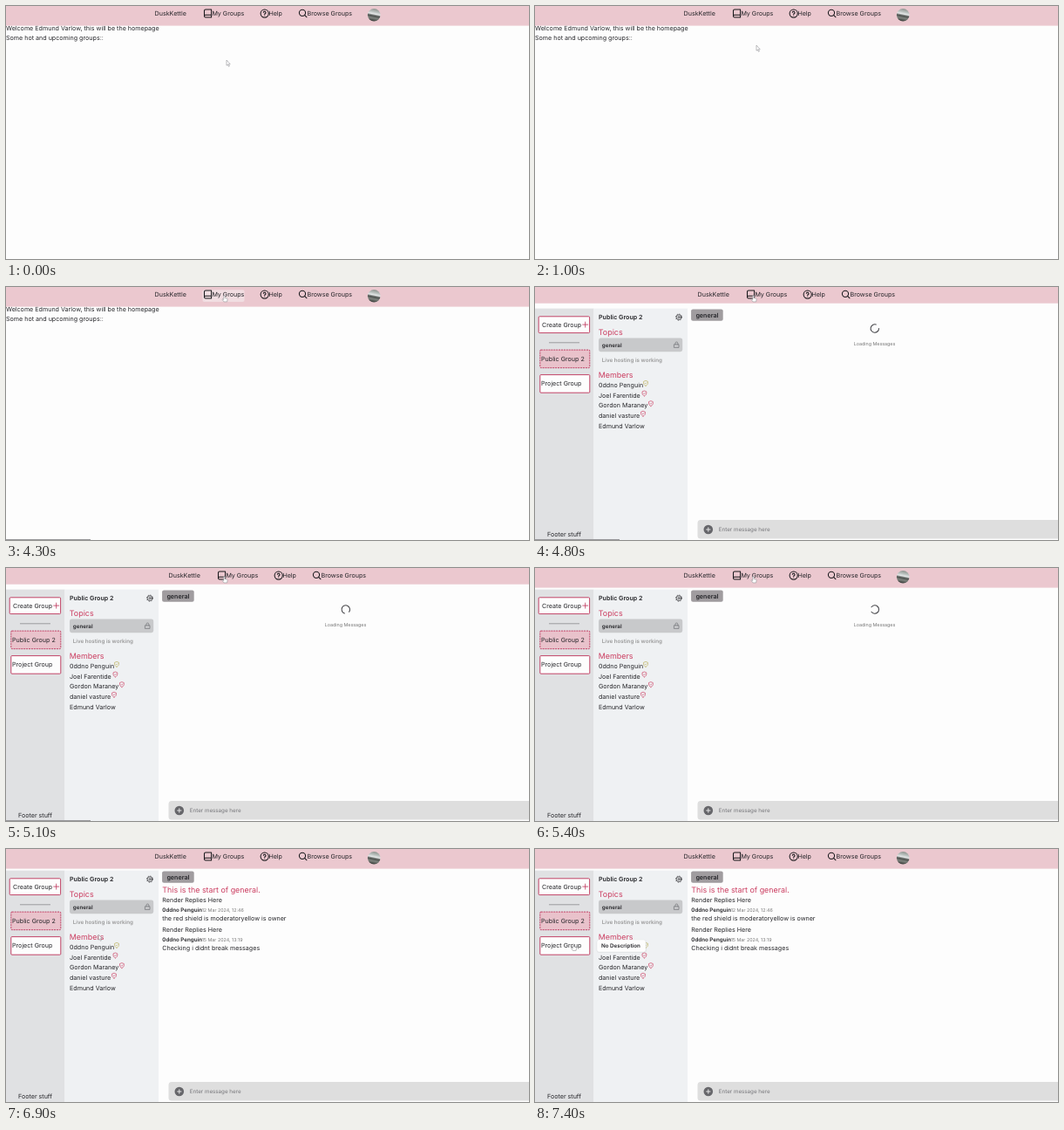
Write an HTML page that moves like this. It is 600 px wide and 290 px high and loops after 8000 ms.

```html
<!DOCTYPE html>
<html lang="en">
<head>
<meta charset="utf-8">
<title>Group chat</title>
<style>
html, body { margin: 0; width: 100%; height: 100%; overflow: hidden; background: #fdfdfd; }
svg { display: block; width: 100%; height: 100%; }
text { font: 7.13px Inter, Roboto, sans-serif; fill: #242428; white-space: pre; text-rendering: geometricPrecision; }
.sm { font-size: 6.24px; }
.xs { font-size: 5.35px; fill: #777; }
.lg { font-size: 8.91px; fill: #cb3d60; }
.b { font-weight: 600; }
.dim { fill: #999; }
.line { fill: none; stroke: #18181b; stroke-linecap: round; stroke-linejoin: round; }
.btn { fill: #fdfdfd; stroke: #bd3159; stroke-width: .9; }
.cursor { fill: #fff; stroke: #88888d; stroke-width: .55; stroke-linejoin: round; }
</style>
</head>
<body>
<svg viewBox="0 0 600 290" preserveAspectRatio="none">
  <defs>
    <linearGradient id="photo" x1=".6" y1="0" x2=".4" y2="1">
      <stop offset="0" stop-color="#8b918c"/>
      <stop offset=".25" stop-color="#b9c0bd"/>
      <stop offset=".42" stop-color="#e4e7e7"/>
      <stop offset=".56" stop-color="#4c504d"/>
      <stop offset=".75" stop-color="#7e837e"/>
      <stop offset="1" stop-color="#2f322f"/>
    </linearGradient>
    <g id="shield" fill="none" stroke-width="2.2" stroke-linejoin="round" stroke-linecap="round">
      <path d="M12 22s8-4 8-10V5l-8-3-8 3v7c0 6 8 10 8 10M9 12l2 2 4-4"/>
    </g>
  </defs>
  <rect width="600" height="290" fill="#fdfdfd"/>

  <g id="home">
    <text x="0" y="28.2">Welcome Edmund Varlow, this will be the homepage</text>
    <text x="0" y="38.7">Some hot and upcoming groups::</text>
  </g>

  <g id="group">
    <rect y="24.6" width="67.5" height="265.4" fill="#e0e1e3"/>
    <rect x="67.5" y="24.6" width="107.5" height="265.4" fill="#eff1f3"/>

    <rect class="btn" x="4.2" y="33.8" width="58.4" height="18.8" rx="1"/>
    <text x="8" y="45.6">Create Group</text>
    <path class="line" d="M54.7 43.1h6M57.7 40.1v6" style="stroke:#bd3159" stroke-width=".8"/>
    <path d="M16 63.8h35" stroke="#929396" stroke-width=".9"/>
    <rect class="btn" x="5.8" y="72.1" width="57" height="20.6" rx="1" style="fill:#e9c2cb" stroke-dasharray="2 .9"/>
    <text x="7" y="84.8">Public Group 2</text>
    <rect class="btn" x="5.8" y="100.6" width="57" height="20.6" rx="1"/>
    <text x="7" y="113.4">Project Group</text>
    <text x="14" y="285.5">Footer stuff</text>

    <text class="b" x="73" y="37.1">Public Group 2</text>
    <g class="line" style="stroke:#36363a">
      <circle cx="165" cy="34.6" r="2.9" stroke-width=".8"/>
      <circle cx="165" cy="34.6" r="3.6" stroke-width=".8" stroke-dasharray="1.1 1.73" stroke-linecap="butt"/>
      <circle cx="165" cy="34.6" r="1.1" stroke-width=".7"/>
    </g>
    <text class="lg" x="72.8" y="55.2">Topics</text>
    <rect x="73" y="58.6" width="96.2" height="15.6" rx="2.4" fill="#c8c9cb"/>
    <text class="sm b" x="76.8" y="68.6">general</text>
    <path class="line" d="M159.8 65.8h5.2v3.6h-5.2zM161 65.800v-1.400a1.400 1.400 0 0 1 2.800 0v1.400" style="stroke:#707276" stroke-width=".7"/>
    <text class="sm b dim" x="76.8" y="85.5">Live hosting is working</text>
    <text class="lg" x="72.8" y="104.2">Members</text>
    <g id="members"></g>

    <rect x="179.1" y="25.4" width="36.6" height="13.4" rx="2" fill="#a09c9f"/>
    <text class="b" x="184.4" y="34.6">general</text>

    <g id="loading">
      <path id="spinner" class="line" d="M4.7 0A4.7 4.7 0 1 1 1.45 -4.47" style="stroke:#48484c" stroke-width="1.1"/>
      <text class="xs" x="389.5" y="67.1" text-anchor="middle">Loading Messages</text>
    </g>
    <g id="chat"></g>

    <path d="M600 267H190q-3.5 0-3.5 3.5v14.500q0 3.500 3.500 3.500H600z" fill="#dedede"/>
    <circle cx="198.8" cy="278" r="5.3" fill="#66666a"/>
    <path d="M196.2 278h5.2M198.8 275.4v5.2" stroke="#e4e4e4"/>
    <text class="sm" x="210.8" y="280.1" style="fill:#77777b">Enter message here</text>
  </g>

  <rect id="bar" width="600" fill="#ebc8cf"/>
  <g id="nav">
    <rect id="pill" x="225.5" y="3.2" width="48" height="13.8" rx="2" fill="#f1dee2"/>
    <text x="170.6" y="11.1">DuskKettle</text>
    <g class="line" stroke-width="1.05">
      <path d="M229 4h6.600v9H229a1.500 1.500 0 0 1-1.500-1.500v-6A1.500 1.500 0 0 1 229 4zM227.500 11.500a1.300 1.300 0 0 1 1.300-1.200h6.800"/>
      <circle cx="296.7" cy="8.6" r="4.6"/>
      <path d="M295.3 7.2a1.4 1.4 0 0 1 2.7.5c0 .9-1.3 1.1-1.3 1.8M296.7 10.9v.1"/>
      <circle cx="340" cy="7.8" r="3.6"/>
      <path d="M342.6 10.4l2.400 2.400"/>
    </g>
    <text x="236.4" y="11.1">My Groups</text>
    <text x="301.4" y="11.1">Help</text>
    <text x="345.5" y="11.1">Browse Groups</text>
  </g>
  <circle id="avatar" cx="422.2" cy="10.3" r="7.3" fill="url(#photo)"/>

  <g id="tip">
    <rect x="70.7" y="104.4" width="57" height="14.4" rx="2.4" fill="#000" opacity=".07"/>
    <rect x="71" y="104" width="56" height="14" rx="2.2" fill="#fdfdfd" stroke="#e2e4e7" stroke-width=".5"/>
    <text class="sm b" x="76" y="113.3">No Description</text>
  </g>
  <rect id="status" y="289" width="97" height="1" fill="#98989b"/>

  <path id="arrow" class="cursor" d="M0 0V6.2L1.4 5L2.4 7.3L3.4 6.9L2.4 4.6H4.2Z"/>
  <path id="hand" class="cursor" d="M-.7 .6a.7.7 0 0 1 1.4 0V3l2.3.6q.7.2.6 1L3.100 7.400H-.6L-2.300 5q-.3-.8.5-.8l1.100.8Z"/>
</svg>
<script>
const LOOP = 8000, STEP = 100;
const $ = id => document.getElementById(id);
const show = (id, on) => $(id).setAttribute('visibility', on ? 'visible' : 'hidden');
const place = (id, x, y, turn = 0) =>
  $(id).setAttribute('transform', `translate(${x} ${y}) rotate(${turn})`);
const label = (x, y, words, kind = '') => `<text class="${kind}" x="${x}" y="${y}">${words}</text>`;

const RED = '#cb3d60', OWNER = '#b9ad55';
const members = [
  ['0ddno Penguin', 123.4, OWNER],
  ['Joel Farentide', 121.8, RED],
  ['Gordon Maraney', 129.3, RED],
  ['daniel vasture', 120.4, RED],
  ['Edmund Varlow']
];
$('members').innerHTML = members.map(([name, x, color], i) => {
  const y = 115.2 + i * 11.6;
  const badge = color
    ? `<use href="#shield" stroke="${color}" transform="translate(${x} ${y - 8.4}) scale(.3)"/>` : '';
  return label(73, y, name) + badge;
}).join('');

const post = (y, date, words) =>
  label(179.3, y, 'Render Replies Here') +
  label(179.3, y + 11.3, '0ddno Penguin', 'sm b') +
  label(224.7, y + 11.2, date, 'xs') +
  label(179.3, y + 21.4, words);
$('chat').innerHTML =
  label(179.3, 50, 'This is the start of general.', 'lg') +
  post(61, '12 Mar 2024, 12:46', 'the red shield is moderatoryellow is owner') +
  post(94.8, '15 Mar 2024, 13:19', 'Checking i didnt break messages');

// Pointer stops: time, x, y
const path = [
  [0, 253, 62], [800, 253, 62], [1000, 254, 45], [1200, 251, 15], [1400, 250.5, 9.5],
  [6200, 250.5, 9.5], [6300, 244, 39], [6600, 196, 69], [6900, 106, 98],
  [7100, 55, 108], [7200, 44, 109], [LOOP, 44, 109]
];
function pointer(t) {
  const i = path.findIndex(p => p[0] > t);
  const [t0, x0, y0] = path[i - 1], [t1, x1, y1] = path[i];
  const k = (t - t0) / (t1 - t0);
  return [x0 + (x1 - x0) * k, y0 + (y1 - y0) * k];
}

function draw(time) {
  const t = Math.floor(time % LOOP / STEP) * STEP;
  const inGroup = t >= 4800, loaded = t >= 5600;
  const bare = inGroup && t < 5200;
  const [x, y] = pointer(t);
  const onNav = y < 17, onProject = x < 63 && y > 101;

  show('home', !inGroup);
  show('group', inGroup);
  show('loading', inGroup && !loaded);
  show('chat', loaded);
  place('spinner', 389.8, 47.5, (t - 4800) * .36);

  $('bar').setAttribute('height', bare ? 18.7 : 22.6);
  place('nav', bare ? 16 : 0, 0);
  show('avatar', !bare);
  show('pill', onNav && !inGroup);
  show('status', t >= 1500 && t < 5200);

  show('tip', t >= 7200);
  $('tip').setAttribute('opacity', Math.min(1, Math.max(0, (t - 7200) / 200)));

  const hand = onNav || onProject;
  show('hand', hand);
  show('arrow', !hand);
  place(hand ? 'hand' : 'arrow', x, y);
}

let start;
function frame(now) {
  start ??= now;
  draw(now - start);
  requestAnimationFrame(frame);
}
draw(0);
requestAnimationFrame(frame);
</script>
</body>
</html>
```
